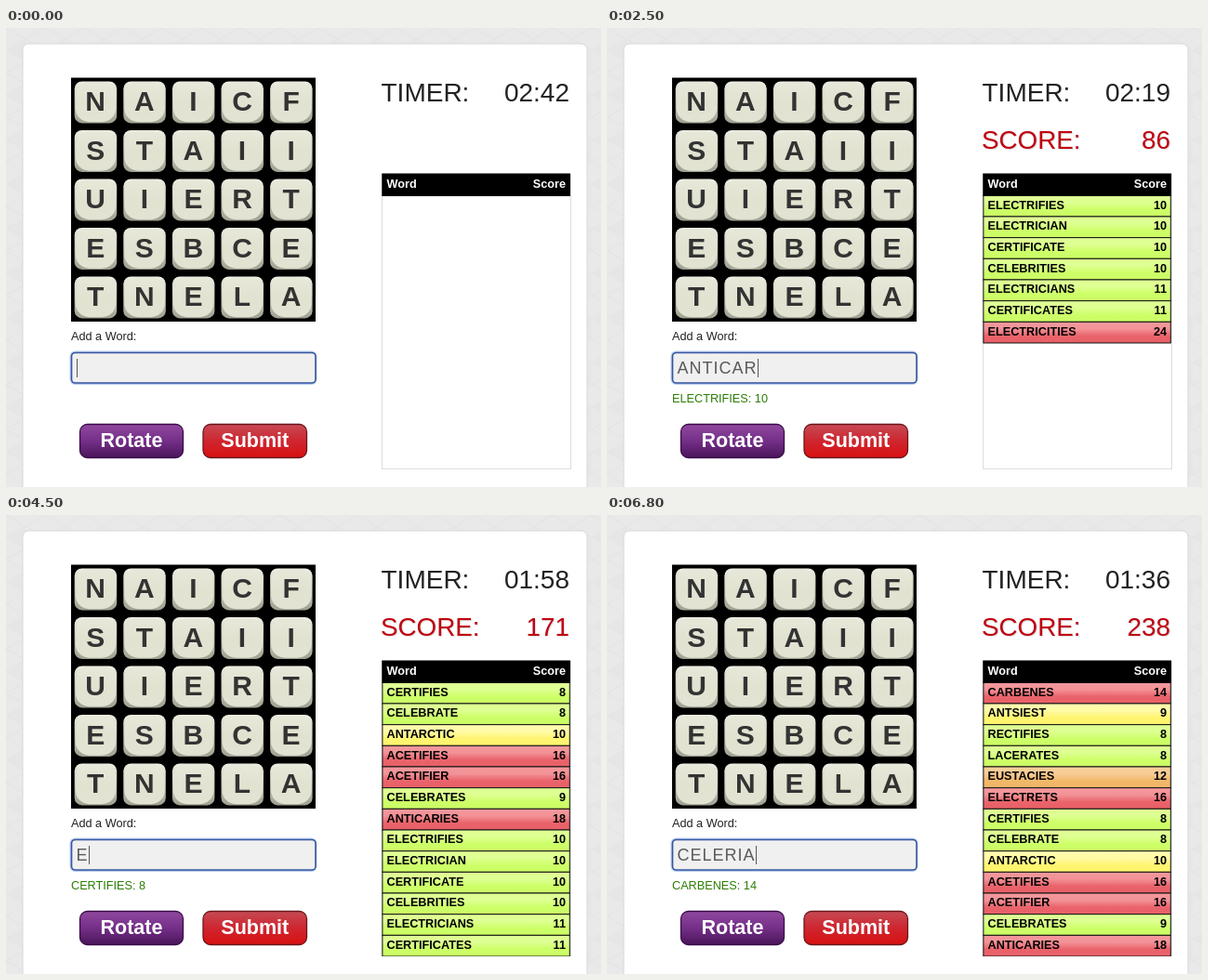
Animation, 640 px wide and 494 px high, one loop 6.9 s. Source, as an HTML page:

```html
<!DOCTYPE html>
<html lang="en">
<head>
<meta charset="utf-8">
<title>Word game</title>
<style>
html, body { margin: 0; width: 100%; height: 100%; overflow: hidden; background: #e8e8e8; }
svg { display: block; width: 640px; height: 494px; font-family: "Liberation Sans", Arial, sans-serif; }
.big { font-size: 28px; }
.small { font-size: 12.7px; }
.bold { font-weight: bold; }
.end { text-anchor: end; }
.mid { text-anchor: middle; }
.die { font-size: 30px; fill: #333; }
.entry { font-size: 18px; letter-spacing: 1px; fill: #5a5a5a; }
.label { font-size: 21.5px; fill: #fff; }
#total { fill: #bf0010; font-size: 27.8px; text-shadow: 1px 1px 1px #0002; }
</style>
</head>
<body>
<svg viewBox="0 0 640 494">
  <defs id="defs">
    <pattern id="paper" width="42" height="48" patternUnits="userSpaceOnUse">
      <path d="M0 0L21 12V36L0 48M42 0L21 12M21 36L42 48M0 24L21 12L42 24L21 36Z" fill="none" stroke="#e3e3e3"/>
      <path d="M0 24L21 12V36ZM21 36L42 48V24Z" fill="#e6e6e6"/>
    </pattern>
    <clipPath id="listClip"><path d="M404 157H608V475H404Z"/></clipPath>
  </defs>
  <rect width="640" height="494" fill="#e9e9e9"/>
  <rect width="640" height="494" fill="url(#paper)"/>
  <rect x="18" y="17" width="607" height="500" rx="6" fill="#fff" stroke="#d8d8d8"/>
  <rect x="70" y="53.5" width="263" height="262.5"/>
  <g id="board"></g>
  <text class="small" x="70" y="336" fill="#222">Add a Word:</text>
  <rect x="68.5" y="347.5" width="266" height="36.5" rx="6" fill="#b9ccef"/>
  <rect x="70.5" y="349.5" width="262.5" height="32.5" rx="4" fill="#f0f0f0" stroke="#35569f" stroke-width="1.6"/>
  <text class="entry" id="entry" x="75.5" y="372"></text>
  <rect id="caret" y="356" width="1" height="20" fill="#555"/>
  <text class="small" id="message" x="70" y="403" fill="#2c7d05"></text>
  <g id="buttons"></g>
  <text class="big" x="403.5" y="79" fill="#222">TIMER:</text>
  <text class="big end" id="timer" x="606" y="79" fill="#222"></text>
  <g id="total">
    <text x="403" y="130">SCORE:</text>
    <text class="end" id="score" x="606" y="130"></text>
  </g>
  <rect x="404.5" y="157.5" width="203" height="317" fill="#fff" stroke="#ddd"/>
  <g id="list" clip-path="url(#listClip)"></g>
  <rect x="404.3" y="156.5" width="202.7" height="24.5"/>
  <g class="small bold" fill="#fff">
    <text x="409.5" y="172">Word</text>
    <text class="end" x="602" y="172">Score</text>
  </g>
</svg>
<script>
const $ = id => document.getElementById(id);

const gradient = (id, ...stops) => `<linearGradient id="${id}" x2="0" y2="1">` +
  stops.map((c, i) => `<stop offset="${i / (stops.length - 1)}" stop-color="${c}"/>`).join('') +
  '</linearGradient>';

$('defs').innerHTML +=
  gradient('g', '#dfff94', '#deff92', '#cdff68', '#cbfb64') +
  gradient('y', '#fffbb0', '#fffaa6', '#fff570', '#fdf36c') +
  gradient('o', '#f8cf9c', '#f7cc96', '#f2b86a', '#f0b566') +
  gradient('r', '#f4989c', '#f29297', '#ea636b', '#e75f67') +
  gradient('rim', '#eeeee4', '#c8c8ba', '#a0a092') +
  gradient('face', '#e8e8da', '#e2e2d1', '#e3e3d3') +
  gradient('purple', '#91489f', '#742f88', '#4b155a') +
  gradient('red', '#c54a54', '#cf2630', '#d81010');

$('board').innerHTML = [...'NAICFSTAIIUIERTESBCETNELA'].map((c, i) => {
  const x = 96.2 + i % 5 * 52.6, y = 79.7 + Math.floor(i / 5) * 52.5;
  return `<rect x="${x - 22.5}" y="${y - 22.3}" width="45.5" height="45" rx="8" fill="url(#rim)"/>
    <rect x="${x - 21.5}" y="${y - 21.8}" width="43.5" height="43.3" rx="15" fill="url(#face)"/>
    <text class="die bold mid" x="${x}" y="${y + 9.5}">${c}</text>`;
}).join('');

const button = (x, w, fill, edge, label) =>
  `<rect x="${x}" y="426.5" width="${w}" height="36" rx="8" fill="url(#${fill})" stroke="${edge}" stroke-width="1.3"/>
   <text class="label bold mid" x="${x + w / 2}" y="451.3">${label}</text>`;
$('buttons').innerHTML = button(79.5, 111, 'purple', '#3a0d48', 'Rotate') +
  button(212, 111.5, 'red', '#6a161c', 'Submit');

// Each entry: word, points, row colour
const words = `ELECTRICITIES 24 r,CERTIFICATES 11 g,ELECTRICIANS 11 g,CELEBRITIES 10 g,CERTIFICATE 10 g,
ELECTRICIAN 10 g,ELECTRIFIES 10 g,ANTICARIES 18 r,CELEBRATES 9 g,ACETIFIER 16 r,ACETIFIES 16 r,
ANTARCTIC 10 y,CELEBRATE 8 g,CERTIFIES 8 g,ELECTRETS 16 r,EUSTACIES 12 o,LACERATES 8 g,
RECTIFIES 8 g,ANTSIEST 9 y,CARBENES 14 r,CELERIACS 9 g`.split(',').map(s => s.trim().split(' '));

// Pace of play: step, seconds left, words finished
const pace = [[0, 162, 0], [19, 144, 5.53], [31, 133, 9.85], [40, 123, 12.95],
  [52, 111, 15.85], [58, 105, 17.95], [68, 96, 20.75]];

function paceAt(step, column) {
  const i = Math.max(1, pace.findIndex(p => p[0] >= step));
  const a = pace[i - 1], b = pace[i];
  return a[column] + (b[column] - a[column]) * (step - a[0]) / (b[0] - a[0]);
}

const row = ([word, points, colour], i) => {
  const y = 180.3 + i * 22.67;
  return `<rect x="404.9" y="${y}" width="201.4" height="22.67" fill="url(#${colour})" stroke="#111"/>
    <text class="small bold" x="409.5" y="${y + 14.4}">${word}</text>
    <text class="small bold end" x="602" y="${y + 14.4}">${points}</text>`;
};

function draw(step) {
  const left = Math.round(paceAt(step, 1)), played = paceAt(step, 2);
  const done = Math.floor(played), found = words.slice(0, done).reverse();
  const word = words[done][0];
  const typed = Math.min(word.length, Math.floor((played - done) / 0.9 * word.length));

  $('timer').textContent = `0${Math.floor(left / 60)}:${String(left % 60).padStart(2, '0')}`;
  $('total').style.display = done ? '' : 'none';
  $('score').textContent = found.reduce((sum, w) => sum + +w[1], 0);
  $('message').textContent = done ? `${found[0][0]}: ${found[0][1]}` : '';
  $('list').innerHTML = found.slice(0, 13).map(row).join('');
  $('entry').textContent = word.slice(0, typed);
  $('caret').setAttribute('x', 76 + (typed ? $('entry').getComputedTextLength() : 0));
  $('caret').style.display = step && step % 13 === 0 ? 'none' : '';
}

const start = performance.now();
let shown = -1;
function tick() {
  const step = Math.floor((performance.now() - start) % 6900 / 100);
  if (step !== shown) draw(shown = step);
  requestAnimationFrame(tick);
}
tick();
</script>
</body>
</html>
```
